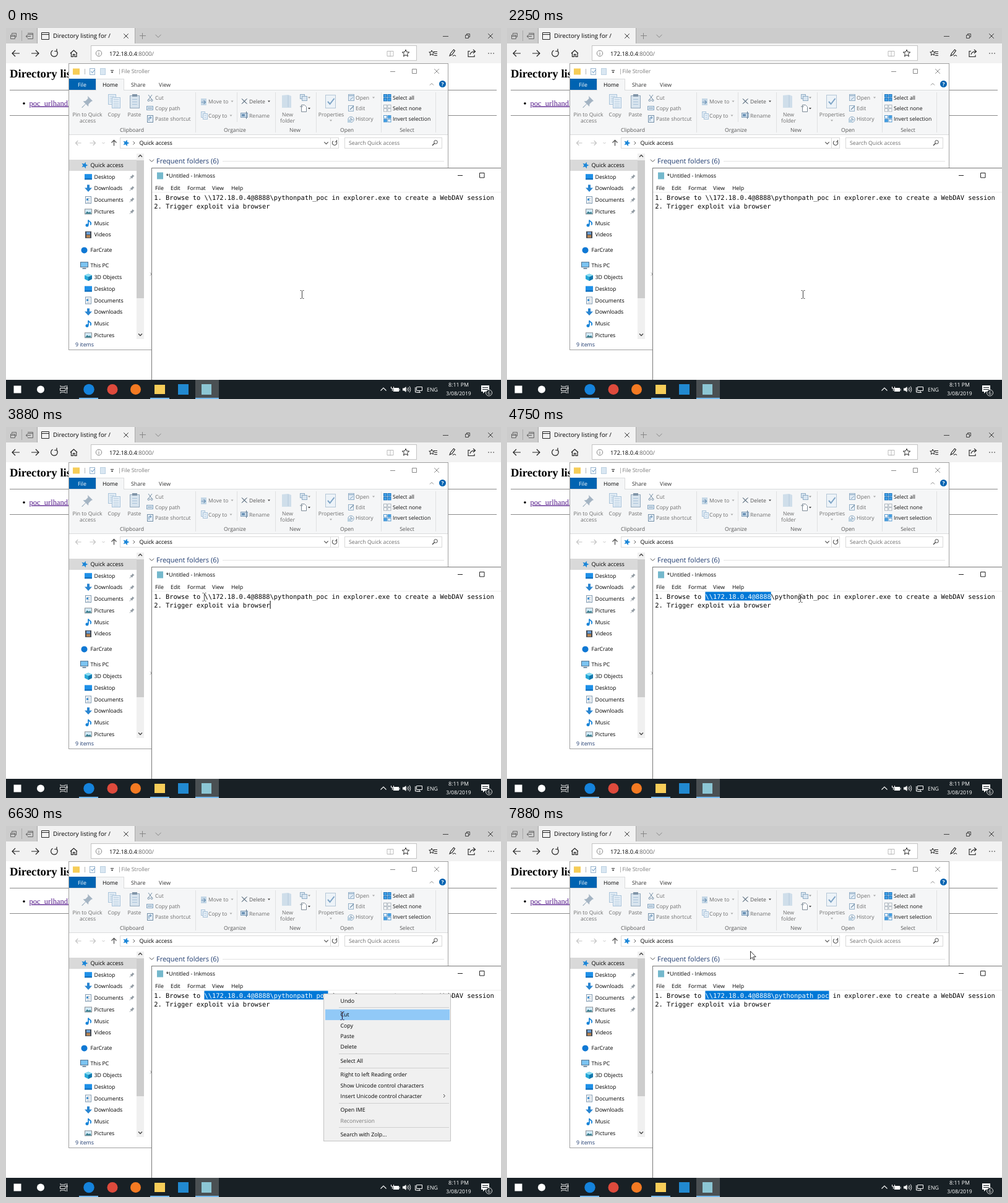
These frames come from a looping animation (800 px wide and 600 px high, 8000 ms). An HTML page:

```html
<!DOCTYPE html>
<html lang="en">
<head>
<meta charset="utf-8">
<title>Desktop</title>
<style>
html, body { margin: 0; width: 100%; height: 100%; overflow: hidden; background: #fff; }
svg { display: block; width: 100%; height: 100%; }
text { font-family: "Open Sans", "Noto Sans", sans-serif; text-rendering: geometricPrecision; white-space: pre; }
.mono { font-family: "DejaVu Sans Mono", "Liberation Mono", monospace; }
.serif { font-family: "Liberation Serif", "Noto Serif", serif; }
#beam { mix-blend-mode: difference; }
</style>
</head>
<body>
<svg id="stage" viewBox="0 0 800 600"></svg>
<script>
const NS = 'http://www.w3.org/2000/svg';
let layer = document.getElementById('stage');

function el(tag, attrs) {
  const e = document.createElementNS(NS, tag);
  for (const k in attrs) e.setAttribute(k, attrs[k]);
  layer.appendChild(e);
  return e;
}
function group(id, draw) {
  const parent = layer, g = el('g', { id });
  layer = g;
  draw();
  layer = parent;
  return g;
}
const rect = (x, y, width, height, fill, stroke = 'none') => el('rect', { x, y, width, height, fill, stroke });
const disc = (cx, cy, r, fill, stroke = 'none') => el('circle', { cx, cy, r, fill, stroke });
const line = (d, stroke = '#222', w = 1, fill = 'none') => el('path', { d, stroke, fill, 'stroke-width': w });
const fillPath = (d, fill) => el('path', { d, fill });
function text(x, y, s, fill = '#000', size = 8.8, more = {}) {
  const e = el('text', { x, y, fill, 'font-size': size, ...more });
  e.textContent = s;
  return e;
}
const mid = (x, y, s, fill, size) => text(x, y, s, fill, size, { 'text-anchor': 'middle' });
const cross = (x, y, r, c) => line(`M${x - r} ${y - r}l${2 * r} ${2 * r}m0 ${-2 * r}l${-2 * r} ${2 * r}`, c);
const chevron = (x, y, r, c, w) => line(`M${x - r} ${y - r / 2}l${r} ${r}l${r} ${-r}`, c, w);
const caretDown = (x, y, c) => fillPath(`M${x - 2} ${y - 1}h4l-2 2.4z`, c);
const arrowX = (x, y, len, dir, c, w = 1.2) =>
  line(`M${x - dir * len / 2} ${y}h${dir * len}m${-dir * len * .42} ${-len * .42}l${dir * len * .42} ${len * .42}l${-dir * len * .42} ${len * .42}`, c, w);
function star(x, y, r, fill, stroke = 'none', turn = 0) {
  let d = '';
  for (let i = 0; i < 10; i++) {
    const a = turn - Math.PI / 2 + i * Math.PI / 5, q = i % 2 ? r * .45 : r;
    d += `${i ? 'L' : 'M'}${x + q * Math.cos(a)} ${y + q * Math.sin(a)}`;
  }
  el('path', { d: d + 'z', fill, stroke });
}
function page(x, y, w, h, c = '#a9c3da', fill = '#e6eff7') {
  rect(x, y, w, h, fill, c);
  for (let i = 3; i < h - 1; i += 3) line(`M${x + 2} ${y + i}h${w - 4}`, c, .8);
}

function browser() {
  rect(0, 0, 800, 600, '#fff');
  rect(0, 0, 800, 25, '#cccccc');
  rect(0, 25, 800, 32, '#f2f2f2');
  rect(51, 0, 157, 26, '#f2f2f2');
  line('M25.5 4v17M50.5 0v25M208.5 0v25', '#a9a9a9');
  line('M9.5 10.5v-2h7v6h-2M7.5 11.5h7v6h-7zM7.5 13.5h7', '#666');
  line('M35 8.5h8.5v9h-8.5M35 10.5h8M40 13.5h-8m3 -2.5l-3 2.5l3 2.5', '#666');
  line('M57.5 7.5h12v11h-12zM57.5 10.5h12', '#222');
  text(76, 16, 'Directory listing for /', '#000', 9.75);
  cross(194, 13, 3.7, '#333');
  line('M216 12.500h10M220.500 8v10', '#888');
  chevron(246, 13, 4.5, '#888');
  line('M706 13.5h9', '#444');
  line('M742.5 11.5h5v5h-5zM744.5 11v-1.500h5v5h-1.500', '#444');
  cross(783, 13, 3.8, '#333');

  arrowX(16, 41, 12, -1, '#222');
  arrowX(47, 41, 12, 1, '#222');
  line('M81.500 37a5.300 5.300 0 1 1 -6 -.8M82 33.800v3.700h-3.800', '#222', 1.2);
  line('M104 41l5.500 -5l5.500 5M105.500 40v6.500h3v-4h2.500v4h3v-6.500', '#222', 1.2);
  rect(137.5, 28.5, 526, 24, '#fff', '#c4c4c4');
  disc(150, 41, 4.7, 'none', '#888');
  line('M150 40v4M150 38v1', '#888');
  text(167, 44.5, '172.18.0.4', '#000', 9.34);
  text(211.8, 44.5, ':8000/', '#666', 9.34);
  line('M621 37.500v9M621 37.500h-5v8h5M621 37.500h5v8h-5', '#bbb');
  star(646, 41, 6, 'none', '#222');
  star(688, 40.5, 4.5, 'none', '#222');
  line('M691 38.500h6M692 41.500h5M692 44.500h5', '#222');
  line('M717 45l1.500 -4l5 -6l2 1.500l-4.500 6.500zM722 45.500q3 -3 5 0', '#222', 1.1);
  line('M750 37.500h-3v9h10v-3M750 43q1 -5 8 -5m-3 -3l3.500 3l-3.500 3', '#222', 1.1);
  for (let i = 0; i < 3; i++) disc(780 + i * 4, 41, .8, '#222');

  text(6, 80.3, 'Directory listing for /', '#000', 18.75, { class: 'serif', 'font-weight': 700 });
  line('M6 100.500h787M6 141.500h787', '#8a8a8a');
  disc(29, 122, 1.8, '#000');
  text(37.5, 125.7, 'poc_urlhandler', '#551a8b', 12.5, { class: 'serif', 'text-decoration': 'underline' });
}

function ribbon() {
  const off = '#6d6d6d', pale = '#a9c3da', size = 8.6;
  rect(102, 100, 612, 72, '#f5f6f7');
  line('M102 100.500h43.500v-18.500M190.500 82v18.500h523.500M102 172.500h612', '#dadbdc');
  rect(146, 82, 44, 19, '#f5f6f7');
  line('M145.500 101v-18.500h45v18.500', '#dadbdc');
  rect(102, 82, 43, 18, '#0063b1');
  text(116, 94.5, 'File', '#fff');
  text(156, 94.5, 'Home');
  text(202, 94.5, 'Share', '#333');
  text(247, 94.5, 'View', '#333');
  line('M685 92.500l3 -3l3 3', '#888');
  disc(705.5, 90.5, 5.5, '#0063b1');
  text(705.5, 93.7, '?', '#fff', 8.5, { 'text-anchor': 'middle', 'font-weight': 700 });
  for (const x of [306, 373, 435, 501, 606, 694]) line(`M${x + .5} 104v${x === 373 ? 48 : 65}`, '#e0e1e2');
  [['Clipboard', 203.5], ['Organize', 370], ['New', 467], ['Open', 551], ['Select', 648]]
    .forEach(([s, x]) => mid(x, 168, s, '#555', size));

  fillPath('M132 110l8 8l-2.500 1l-4 4l-.5 4l-4 -4l-5.500 6l-1 0l0 -1l6 -5.500l-4 -4l4 -.5l4 -4z', '#a4b4c3');
  page(165.500, 107.500, 12, 16);
  page(171.500, 112.500, 13, 17);
  rect(200.500, 109.500, 15, 20, '#d8e4ee', '#93a9bd');
  rect(204, 107, 8, 4, '#8296a9');
  line('M204 115.500h8M204 119.500h8M204 123.500h8', pale);
  line('M230 108l6 8M236 108l-6 8', '#7590a8');
  disc(230.5, 117, 1.5, 'none', '#7590a8');
  disc(235.5, 117, 1.5, 'none', '#7590a8');
  rect(227.500, 126.500, 10, 6, '#dce9f4', '#88a6c0');
  line('M229 129.500h7', '#7590a8');
  rect(228.500, 141.500, 9, 11, '#e6eff7', '#7590a8');
  line('M231 150v-5h4m-2 -2l2 2l-2 2', '#5a86ad');
  mid(131.5, 142.5, 'Pin to Quick', off, size);
  mid(132, 152.5, 'access', off, size);
  mid(174.5, 142.5, 'Copy', off, size);
  mid(207.5, 142.5, 'Paste', off, size);
  text(241, 116, 'Cut', off, size);
  text(241, 133, 'Copy path', off, size);
  text(241, 150, 'Paste shortcut', off, size);

  rect(315, 114, 9, 11, '#c4d7e6');
  arrowX(319, 120, 7, 1, '#6e93b5');
  page(315.500, 135.500, 6, 9);
  page(318.500, 138.500, 7, 9);
  cross(385, 118.5, 4, '#5f7182');
  cross(385.6, 118.5, 4, '#5f7182');
  rect(379.500, 137.500, 11, 7, '#d5e4f1', '#7f9cb7');
  rect(381, 139, 5, 4, '#6d93b6');
  line('M388.500 135v12', '#61788d');
  text(327, 122, 'Move to', off, size);
  text(327, 144.6, 'Copy to', off, size);
  text(393, 122, 'Delete', '#555', size);
  text(393, 144.6, 'Rename', off, size);
  caretDown(365.5, 118.5, '#aaa');
  caretDown(363.5, 141.5, '#aaa');
  caretDown(425, 118.5, '#444');

  fillPath('M446 109l10 -1l5 2v19l-15 0z', '#cfdeea');
  line('M456 109v19', '#b3c9db');
  rect(475.500, 107.500, 7, 7, '#d8e5f0', '#92aec6');
  rect(478.500, 110.500, 8, 7, '#d8e5f0', '#92aec6');
  caretDown(490, 112.5, '#999');
  line('M477.500 124.500h5l3 3v8h-8zM475 127h5', '#7d8a96', 1, '#fff');
  caretDown(490, 130, '#444');
  mid(455, 142.5, 'New', off, size);
  mid(455, 152.5, 'folder', off, size);

  rect(516.500, 108.500, 16, 21, '#edf3f8', '#b5c7d7');
  line('M520 119l3.500 4l7 -9', '#7fa5c7', 2);
  mid(525.5, 142.5, 'Properties', off, size);
  caretDown(525, 149.5, '#aaa');
  rect(553.500, 107.500, 9, 10, '#e2ecf5', '#92aec6');
  line('M554 109.500h8M556 116l5 -4', '#7fa0bd');
  rect(553.500, 125.500, 8, 9, '#eef4f9', '#92aec6');
  line('M556 132l6 -6', '#7590a8', 1.3);
  disc(557.5, 148, 4.7, '#e8eef4', '#92aec6');
  line('M557.500 145v3.500h3', '#7590a8');
  rect(552, 148, 6, 5, '#b8cfdf');
  text(565, 116, 'Open', off, size);
  text(565, 133, 'Edit', off, size);
  text(565, 150, 'History', off, size);
  caretDown(594, 112.5, '#aaa');

  for (let i = 0; i < 4; i++) {
    const x = 610.500 + i % 2 * 6.500, dy = (i >> 1) * 6;
    rect(x, 107.500 + dy, 5, 4.500, '#3f9fe6', '#1c74bd');
    rect(x, 124.500 + dy, 5, 4.500, '#fff', '#aab4bd');
    rect(x, 141.500 + dy, 5, 4.500, i === 1 || i === 2 ? '#3f9fe6' : '#fff', '#5a9bd0');
  }
  text(625, 116, 'Select all', '#111', size);
  text(625, 133, 'Select none', '#111', size);
  text(625, 150, 'Invert selection', '#111', size);
}

const icons = {
  desktop(x, y) { rect(x - 6, y - 4.5, 12, 9, '#1e90e8'); rect(x - 6, y + 2.5, 12, 2, '#0f6cb8'); },
  down(x, y) { fillPath(`M${x - 2} ${y - 6}h4v5h4l-6 6.500l-6 -6.500h4z`, '#2a86d1'); },
  doc(x, y) { page(x - 4.5, y - 5.5, 9, 11, '#7d97ae', '#fff'); rect(x - 3, y - 2, 3, 3, '#3d8fd0'); },
  pics(x, y) { rect(x - 5.5, y - 4, 11, 8, '#d4ecfa', '#8a8f94'); fillPath(`M${x - 5} ${y + 3.500}l3 -4l3 2l2 -1.500l2 3.500z`, '#3c7f8f'); },
  music(x, y) { line(`M${x} ${y + 3}v-8q1 2 3.500 3.500q1.500 2 0 4.500`, '#1683d8', 1.7); disc(x - 2, y + 3.5, 2.5, '#1683d8'); },
  video(x, y) {
    rect(x - 5, y - 5.5, 10, 11, '#444b55');
    rect(x - 3, y - 4.5, 6, 4, '#6aa1d8');
    rect(x - 3, y + .5, 6, 4, '#b98450');
  },
  cloud(x, y) { disc(x, y, 5, '#0f78d4'); },
  pc(x, y) { rect(x - 6, y - 5.5, 12, 8, '#7cc4f2', '#4c6f8d'); rect(x - 3, y + 4, 6, 1.5, '#4c6f8d'); },
  cube(x, y) {
    fillPath(`M${x - 6} ${y - 3}l6 -2.500l6 2.500v6l-6 3l-6 -3z`, '#27a9d8');
    fillPath(`M${x} ${y - .500}l6 -2.500v6l-6 3z`, '#1377ad');
    fillPath(`M${x - 6} ${y - 3}l6 -2.500l6 2.500l-6 2.500z`, '#8cdcf2');
  }
};

function sidebar() {
  rect(102, 213, 109, 18, '#d9d9d9');
  star(127, 222, 5.5, '#1b86d8', 'none', .3);
  text(136.5, 225, 'Quick access', '#000', 9);
  [['Desktop', 'desktop', 240.7, 1], ['Downloads', 'down', 259.4, 1], ['Documents', 'doc', 278.1, 1],
   ['Pictures', 'pics', 296.9, 1], ['Music', 'music', 315.6], ['Videos', 'video', 334.4],
   ['FarCrate', 'cloud', 359.4, 0, 1], ['This PC', 'pc', 384.2, 0, 1],
   ['3D Objects', 'cube', 403.1], ['Desktop', 'desktop', 421.9], ['Documents', 'doc', 440.6],
   ['Downloads', 'down', 459.4], ['Music', 'music', 478.1], ['Pictures', 'pics', 496.9]
  ].forEach(([s, icon, y, pinned, top]) => {
    icons[icon](top ? 126.5 : 133, y);
    text(top ? 136.5 : 142.5, y + 3, s);
    if (pinned) fillPath(`M204.500 ${y - 4}l3 3l-1.500 .5l-1.500 2l-.5 1.500l-1.500 -1.500l-2.500 2.500l-.5 -.5l2.500 -2.500l-1.500 -1.500l2 -.5l1.500 -1.500z`, '#929ba3');
  });
  rect(211, 203, 12, 300, '#f0f0f0');
  rect(211, 214, 12, 223, '#cdcdcd');
  line('M214 208.500l3 -3l3 3', '#444', 1.3);
  chevron(217, 496, 3, '#444', 1.3);
}

function files() {
  rect(101.5, 57.5, 613, 463, '#fff', '#a0a0a0');
  rect(108, 65.5, 11, 10, '#f6cd58');
  line('M127.500 66v9M183.500 66v9', '#b5b5b5');
  rect(135.500, 65.500, 8, 10, '#f4f8fb', '#9db7cf');
  line('M137.500 70l2 2.500l4 -5', '#5a8fc0');
  rect(152.500, 65.500, 8, 10, '#d9e7f2', '#bcd1e2');
  line('M169 68.500h5', '#333');
  caretDown(171.5, 71.5, '#333');
  text(186.5, 73.3, 'File Stroller', '#7a7a7a');
  line('M621 70.500h8M656.500 66.500h7v7h-7z', '#8a8a8a');
  cross(696, 70, 3.8, '#8a8a8a');
  ribbon();

  arrowX(117, 186, 9, -1, '#c4c4c4');
  arrowX(140, 186, 9, 1, '#c4c4c4');
  chevron(157.5, 186, 2, '#c4c4c4');
  line('M174.500 190.500v-9m-4 4l4 -4l4 4', '#555', 1.3);
  rect(184.5, 177.5, 353, 17, '#fff', '#d9d9d9');
  star(194, 186, 5.5, '#1b86d8', 'none', .3);
  line('M205.500 183.500l2.500 2.500l-2.500 2.500', '#555');
  text(215.5, 189, 'Quick access', '#000', 9);
  chevron(517.5, 186, 3.2, '#555', 1.2);
  line('M524.500 178v16', '#d9d9d9');
  line('M533.500 183a3.700 3.700 0 1 1 -4.500 -.3M534.500 181v3h-3', '#555', 1.1);
  rect(547.5, 177.5, 157, 17, '#fff', '#d9d9d9');
  text(554, 189, 'Search Quick access', '#6d6d6d');
  disc(694.5, 184.5, 2.8, 'none', '#444');
  line('M692.500 186.500l-3.500 3.500', '#444', 1.4);

  sidebar();
  chevron(235.5, 214.5, 3.6, '#555');
  text(243, 218.5, 'Frequent folders (6)', '#1e3a6e', 11);
  line('M350 215.500h358', '#e2e2e2');
  line('M233 395.500l2 2.500l-2 2.500', '#999');
  text(112, 514.6, '9 items', '#1e3a6e');
}

const CHAR = 6.25, LEFT = 239.2, SEL = LEFT + 13 * CHAR;
const LINE1 = 277.6, LINE2 = 291.6;
const share = '\\\\172.18.0.4@8888\\pythonpath_poc';
const mono = (x, y, s, c) => text(x, y, s, c, 10.38, { class: 'mono' });
let selBox, selText, caret;

function editor() {
  rect(235.5, 226.5, 580, 360, '#fff', '#777');
  rect(244, 233.5, 10, 11, '#74b8cc');
  text(258.5, 242, '*Untitled - Inkmoss');
  line('M730 238.500h8M765.500 234.500h7.500v7.500h-7.500z', '#222');
  [['File', 241], ['Edit', 266], ['Format', 293], ['View', 333], ['Help', 364]]
    .forEach(([s, x]) => text(x, 261.5, s));
  line('M236 265.500h564', '#eee');
  mono(LEFT, LINE1, '1. Browse to ' + share + ' in explorer.exe to create a WebDAV session', '#000');
  mono(LEFT, LINE2, '2. Trigger exploit via browser', '#000');
  selBox = rect(SEL, 266.6, 0, 14, '#0078d7');
  selText = mono(SEL, LINE1, '', '#fff');
  caret = rect(426.6, 281, 1, 13, '#000');
}

function taskbar() {
  const bar = '#182025';
  rect(0, 569, 800, 31, bar);
  rect(306, 569, 38, 31, '#4a5053');
  for (const [x, w] of [[118, 31], [233, 31], [306, 38]]) rect(x, 598, w, 2, '#76b9ed');
  rect(12.5, 578.5, 12, 12, '#fff');
  disc(56, 584.5, 6, '#fff');
  line('M88 578v2h8v-2M88 591v-2h8v2M87.500 582.500h8.500v4h-8.500zM98.500 578v13', '#e8e8e8');
  rect(97.5, 581, 2, 3, '#e8e8e8');
  disc(134, 584.5, 8.7, '#1583dc');
  disc(172, 584.5, 8.5, '#de4a3c');
  disc(209.5, 584.5, 8.5, '#f47a22');
  rect(240, 577, 17, 15, '#f7cd59');
  rect(278, 576, 17, 17, '#2189d0');
  rect(316, 576, 16, 17, '#8cc6d4');

  line('M605.500 586.500l4.500 -4.500l4.500 4.500', '#fff', 1.1);
  rect(626.5, 582.5, 8, 5, '#fff', '#fff');
  line('M636 583.500v3M622.500 580v3h4v-3M624.500 583v4', '#fff');
  fillPath('M641 582.500h2.500l3 -2.500v9l-3 -2.500h-2.500z', '#fff');
  line('M648 582.500q1.500 2 0 4M650 581q2.500 3.500 0 7M652 579.500q3.500 5 0 10', '#fff', .9);
  line('M663.500 580.500h9v6h-9zM668 587v2.500M664 589.500h6M661.500 581v8h3', '#fff');
  text(680, 587.6, 'ENG', '#fff');
  mid(731.5, 580.3, '8:11 PM', '#fff');
  mid(731.5, 594.4, '3/08/2019', '#fff', 8.5);
  fillPath('M768 578h13v10h-7l-3 3v-3h-3z', '#fff');
  line('M770 581.500h9M770 584.500h9', bar);
  disc(780.5, 590, 5, bar, '#ddd');
  mid(780.5, 593, '6', '#fff', 8);
}

const rows = [['Undo', 282.6], ['Cut', 305.2], ['Copy', 322.6], ['Paste', 340], ['Delete', 357.2],
  ['Select All', 379.7], ['Right to left Reading order', 402.3], ['Show Unicode control characters', 419.6],
  ['Insert Unicode control character', 436.9], ['Open IME', 459.4], ['Reconversion', 476.7], ['Search with Zolp...', 499.3]];
let hover;

function popup() {
  rect(513.5, 271.5, 205, 238, '#f0f0f0', '#c4c4c4');
  hover = rect(516, 0, 201, 17.3, '#91c9f7');
  for (const y of [293.5, 368.5, 391.5, 448.5, 487.5]) line(`M538 ${y}h178`, '#cfcfcf');
  for (const [s, y] of rows) text(540.5, y + 3, s, s === 'Reconversion' ? '#7a7a7a' : '#000');
  line('M707 434l2.500 2.500l-2.500 2.500', '#333');
}

browser();
files();
editor();
taskbar();
const menu = group('menu', popup);
const beam = group('beam', () =>
  line('M-2.500 -6.500h2M1.500 -6.500h2M.5 -6v12M-2.500 6.500h2M1.500 6.500h2', '#b4b4b4', 1.1));
const arrow = group('arrow', () =>
  line('M.5 .5v12.500l2.900 -2.700l2 4.500l1.900 -.8l-2 -4.400h3.900z', '#222', .9, '#fff'));

// time, x, y
const path = [[0, 478, 431], [2250, 478, 431], [2625, 459, 409], [3000, 405, 352], [3500, 326, 281],
  [3750, 320, 275], [4125, 320, 275], [4375, 364, 276], [4750, 474, 277], [5000, 520, 276],
  [5250, 523, 274], [5375, 515, 272], [6250, 515, 272], [6750, 552, 318], [7000, 554, 323],
  [7250, 554, 323], [7875, 393, 202]];
// time, selected characters
const picked = [[4125, 0], [4500, 7], [4750, 17], [5125, 32]];
const LOOP = 8000, TICK = 125;

function at(keys, t, col) {
  if (t <= keys[0][0]) return keys[0][col];
  for (let i = 1; i < keys.length; i++) {
    const a = keys[i - 1], b = keys[i];
    if (t <= b[0]) return a[col] + (b[col] - a[col]) * (t - a[0]) / (b[0] - a[0]);
  }
  return keys[keys.length - 1][col];
}
const show = (e, on) => e.setAttribute('visibility', on ? 'visible' : 'hidden');

function draw(now) {
  const t = Math.floor(now % LOOP / TICK) * TICK;
  const x = Math.round(at(path, t, 1)), y = Math.round(at(path, t, 2));
  const n = Math.round(at(picked, t, 1));
  const open = t >= 6125 && t < 7250;
  const blink = (t + 610) % 1060 < 530;

  selBox.setAttribute('width', n * CHAR);
  selText.textContent = share.slice(0, n);
  show(caret, blink && t < 4125);

  const row = open && x > 516 && rows.find(r => Math.abs(r[1] - y) < 8.7);
  show(menu, open);
  show(hover, !!row);
  if (row) hover.setAttribute('y', row[1] - 8.6);

  const pointer = y < 266;
  show(arrow, pointer);
  show(beam, !pointer);
  (pointer ? arrow : beam).setAttribute('transform', `translate(${x} ${y})`);
}
function tick() {
  draw(performance.now());
  requestAnimationFrame(tick);
}
tick();
</script>
</body>
</html>
```
